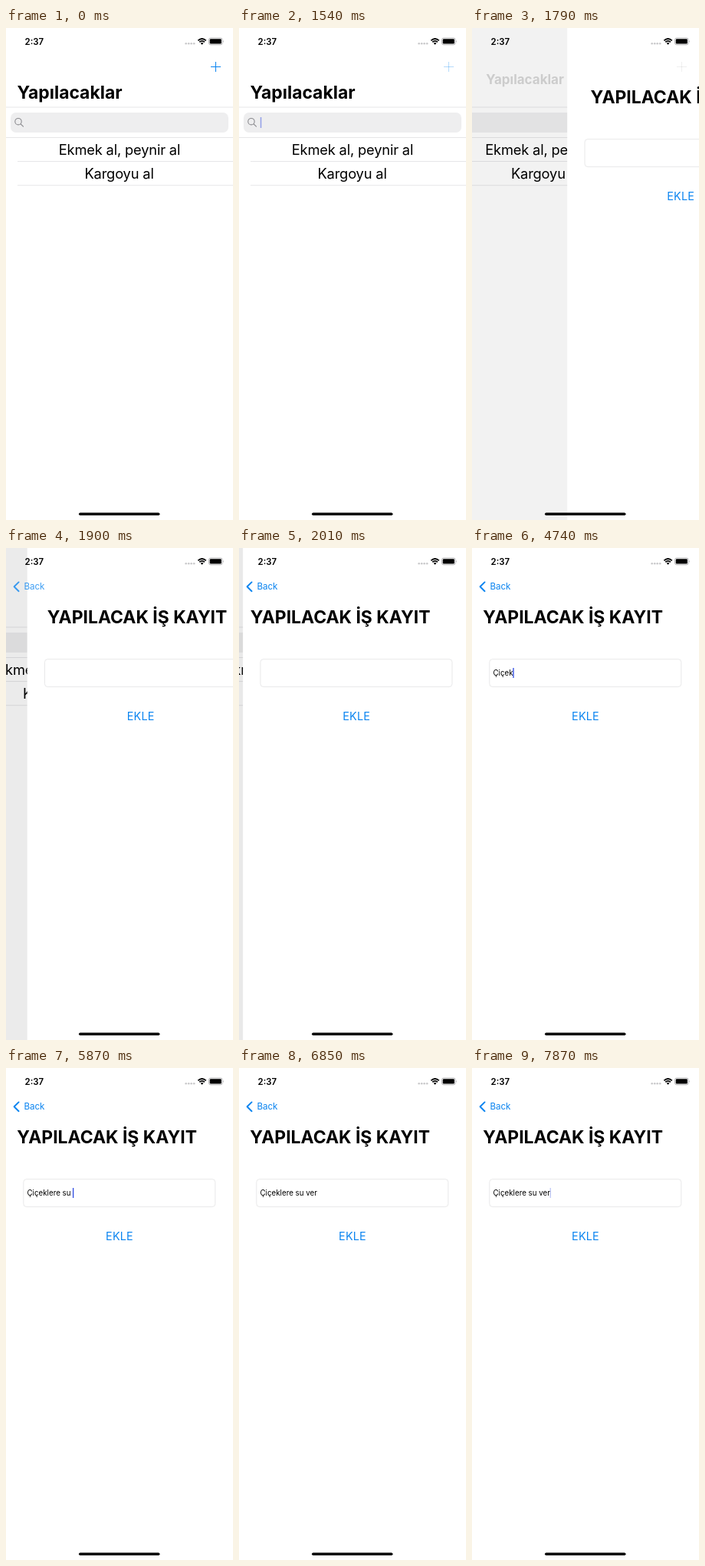
An HTML page that plays this animation: 296x640 px, repeating every 8 s.

```html
<!DOCTYPE html>
<html lang="tr">
<head>
<meta charset="utf-8">
<title>Yapılacaklar</title>
<style>
  html, body { margin: 0; width: 100%; height: 100%; overflow: hidden; background: #fff; }
  svg { display: block; width: 296px; height: 640px; }
  text { font-family: Inter, Roboto, sans-serif; font-optical-sizing: none; white-space: pre; }
  .title { font-size: 22.9px; font-weight: 700; }
  .row { font-size: 18.3px; letter-spacing: -.17px; text-anchor: middle; }
  .rule { stroke: #e0e0e2; stroke-width: .8; }
  .caret { fill: #3a55e4; }
  .blue { fill: #0a84f0; }
  .line { fill: none; stroke: #0a84f0; }
</style>
</head>
<body>
<svg viewBox="0 0 296 640">
  <g id="list">
    <rect width="400" height="640" fill="#fff"/>
    <rect x="6" y="110" width="284" height="26" rx="7" fill="#eeeeef"/>
    <g fill="none" stroke="#8a8a8e" stroke-width="1.1" stroke-linecap="round">
      <circle cx="16" cy="121.7" r="4.2"/>
      <path d="M19.1 124.8L22.5 128.2"/>
    </g>
    <rect id="searchCaret" class="caret" x="27.8" y="116" width="1.5" height="14"/>
    <path class="rule" d="M0 103H296M0 142.5H296M15 173.5H296M15 204.7H296"/>
    <text class="row" x="148" y="165.2">Ekmek al, peynir al</text>
    <text class="row" x="147.6" y="196.4">Kargoyu al</text>
  </g>
  <rect id="dim" width="296" height="640"/>

  <g id="form">
    <rect width="296" height="640" fill="#fff"/>
    <rect x="22.8" y="144.6" width="250" height="36" rx="4" fill="#fff" stroke="#e2e2e4" stroke-width=".8"/>
    <text id="entry" x="27.5" y="166" font-size="9.75"></text>
    <rect id="entryCaret" class="caret" y="156" width="1.4" height="13"/>
    <text class="blue" x="148" y="223.6" font-size="14.4" letter-spacing=".2" text-anchor="middle">EKLE</text>
  </g>

  <text id="listTitle" class="title">Yapılacaklar</text>
  <text id="formTitle" class="title" y="97.7">YAPILACAK İŞ KAYIT</text>
  <path id="plus" class="line" d="M267 50.5H280M273.5 44V57"/>
  <g id="back">
    <path class="line" d="M16.6 44.4L10.6 50.3L16.6 56.2" stroke-width="1.9" stroke-linecap="round" stroke-linejoin="round"/>
    <text class="blue" x="23.4" y="54.3" font-size="11.6">Back</text>
  </g>

  <text x="24.6" y="21.7" font-size="11.4" font-weight="600">2:37</text>
  <g fill="#c9c9cb">
    <circle cx="234.7" cy="20.2" r="1.3"/><circle cx="238.2" cy="20.2" r="1.3"/>
    <circle cx="241.7" cy="20.2" r="1.3"/><circle cx="245.2" cy="20.2" r="1.3"/>
  </g>
  <g fill="none" stroke="#000" stroke-width="1.8">
    <path d="M250.4 16.3Q255.6 11.6 260.8 16.3"/>
    <path d="M252.3 18.3Q255.6 15.4 258.9 18.3"/>
  </g>
  <path d="M253.7 19.7Q255.6 18.2 257.5 19.7L255.6 21.7Z"/>
  <rect x="264.4" y="13" width="17.8" height="8.8" rx="2.5" fill="none" stroke="#a4a4a6" stroke-width=".8"/>
  <rect x="265.7" y="14.3" width="15.2" height="6.2" rx="1.3"/>
  <path d="M283.2 16Q284.6 17.4 283.2 18.8Z" fill="#a4a4a6"/>
  <rect x="95" y="630.5" width="105.5" height="3.5" rx="1.75"/>
</svg>
<script>
const LOOP = 8000, WIDTH = 296, STEP = 110;
const PUSH = 1680, PUSH_END = 2230;
const el = Object.fromEntries([...document.querySelectorAll('[id]')].map(n => [n.id, n]));

// [time, value] pairs, each held until the next
const blink = [
  [0, 0], [110, 1], [690, .5], [810, 0], [1050, .5], [1160, 1], [1540, .5], [PUSH, 0],
  [2670, .9], [3170, .6], [3280, .3], [3390, 0], [3570, 1],
  [6850, 0], [7080, .3], [7190, .6], [7310, 1], [7750, .6], [7870, .3]
];
const typed = [
  [0, ''], [4140, 'Ç'], [4490, 'Çiç'], [4630, 'Çiçe'], [4740, 'Çiçek'], [4920, 'Çiçekl'],
  [5080, 'Çiçekle'], [5190, 'Çiçeklere'], [5360, 'Çiçeklere '], [5500, 'Çiçeklere s'],
  [5620, 'Çiçeklere su'], [5870, 'Çiçeklere su '], [5980, 'Çiçeklere su v'],
  [6120, 'Çiçeklere su ve'], [6240, 'Çiçeklere su ver']
];

const held = (keys, t) => keys.filter(k => k[0] <= t).pop()[1];
const clamp = v => Math.min(1, Math.max(0, v));
const set = (node, attrs) => {
  for (const k in attrs) node.setAttribute(k, attrs[k]);
};

function drawPush(t) {
  const snapped = t < PUSH ? 0 : t >= PUSH_END ? LOOP : PUSH + Math.floor((t - PUSH) / STEP) * STEP;
  const age = Math.max(0, snapped - PUSH - 4) / 1000;
  const phase = 18.4 * age;
  const left = (1 + phase) * Math.exp(-phase);   // critically damped spring
  const nav = 1 - (1 - clamp(age / .34)) ** 2;   // bar eases out on its own

  set(el.list, { transform: `translate(${-.3 * WIDTH * (1 - left)} 0)` });
  set(el.dim, { opacity: .088 * (1 - left) });
  set(el.form, { transform: `translate(${WIDTH * left} 0)` });
  set(el.formTitle, { x: 14.3 + WIDTH * (1 - nav) });
  set(el.listTitle, {
    transform: `translate(${14.6 + 7 * nav} ${91.6 - 36 * nav}) scale(${1 - .49 * nav})`,
    opacity: clamp(1 - nav / .62)
  });
  set(el.back, { opacity: clamp((nav - .55) / .4) });
  el.plus.style.stroke = nav > 0 ? '#888' : '';
  set(el.plus, { opacity: nav > 0 ? clamp(1 - nav / .61) : t < 1540 ? 1 : .3 });
}

function draw(t) {
  drawPush(t);
  const caret = held(blink, t);
  const text = held(typed, t);
  if (el.entry.textContent !== text) el.entry.textContent = text;
  const end = text ? el.entry.getComputedTextLength() : 0;
  set(el.searchCaret, { opacity: t < PUSH ? caret : 0 });
  set(el.entryCaret, { x: 27.2 + end, opacity: t > PUSH_END ? caret : 0 });
}

const start = performance.now();
function tick() {
  draw((performance.now() - start) % LOOP);
  requestAnimationFrame(tick);
}
tick();
</script>
</body>
</html>
```
